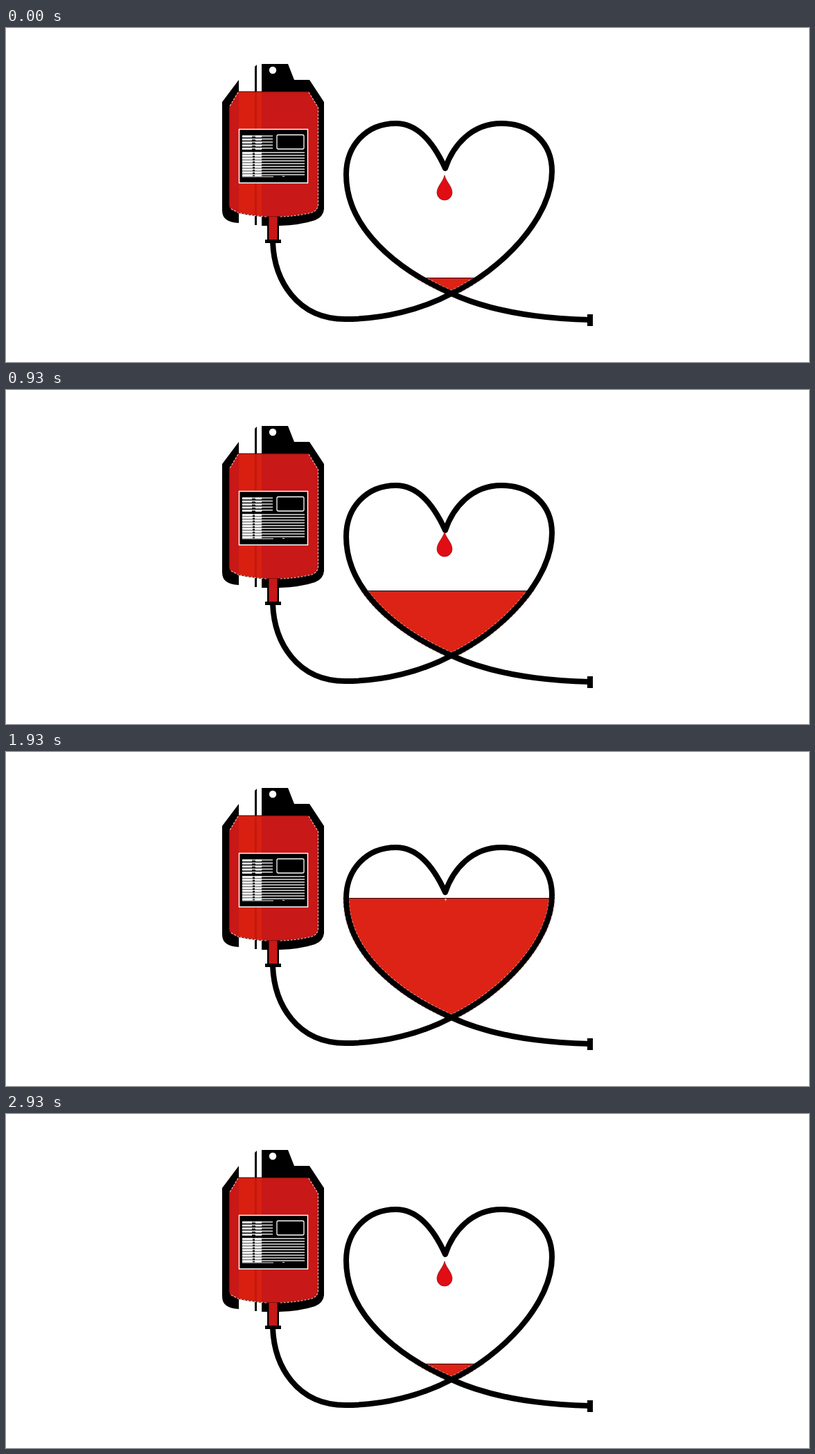
These frames come from a looping animation (1159x483 px, 3140 ms). An HTML page:

```html
<!DOCTYPE html>
<html lang="en">
<head>
<meta charset="utf-8">
<title>Blood donation</title>
<style>
  html, body { margin: 0; width: 100%; height: 100%; overflow: hidden; background: #fff; }
  svg { display: block; width: 100%; height: 100%; }
</style>
</head>
<body>
<svg viewBox="0 0 1159 483">
  <defs>
    <path id="heart" d="M643 384C715 350 788 275 788 207C788 165 757 138 715 138C672 138 645 170 634 203C619 170 597 138 563 138C520 138 491 170 491 212C491 290 565 350 643 384"/>
    <path id="body" d="M335 92H437L451 115V256Q450 265 441 267Q420 272 394 273H376Q352 271 335 267Q322 263 322 257V114Z"/>
    <clipPath id="bodyClip"><use href="#body"/></clipPath>
    <clipPath id="heartClip"><use href="#heart"/></clipPath>
    <clipPath id="levelClip"><rect id="liquid" x="480" width="320" height="300"/></clipPath>
  </defs>

  <!-- bag shell -->
  <path d="M336 75V282Q312 281 312 264V107Z"/>
  <path d="M359 56L362 53V285H359Z"/>
  <path d="M369 52H407L416 75H438L459 107V262Q458 273 446 278Q425 285 394 286H369Z"/>
  <circle cx="385" cy="61" r="5.2" fill="#fff"/>

  <!-- bag contents -->
  <g clip-path="url(#bodyClip)">
    <path fill="#c81817" d="M320 90H455V275H320Z"/>
    <path fill="#d91f0f" d="M336 90H369V275H336Z"/>
    <path fill="#c21912" d="M359 90H362V275H359Z"/>
  </g>
  <use href="#body" fill="none" stroke="#3a0806"/>
  <path d="M437 93L450.500 115V256Q449 265 441 267Q420 272 396 273M335 93L323 113M376 273Q352 271 335 267L324 261" fill="none" stroke="#eab0a8" stroke-width="1.200" stroke-dasharray="3 2"/>

  <!-- label -->
  <rect x="336.500" y="146.500" width="99" height="77.500" stroke="#fff" stroke-width="1.500"/>
  <rect x="391" y="154.500" width="39" height="20.500" rx="2" stroke="#fff" stroke-width="1.300"/>
  <g id="rows" fill="#fff"></g>

  <!-- tube -->
  <path fill="#c81817" d="M378 273H393V308H378Z"/>
  <path d="M377 273H379.500V308H377ZM391.500 273H394V308H391.500ZM374 306H397V311H374Z"/>
  <g clip-path="url(#levelClip)">
    <use href="#heart" fill="#dc2315"/>
    <use href="#heart" fill="none" stroke="#f0aaa0" stroke-width="9.600" stroke-dasharray="3 3"/>
  </g>
  <g clip-path="url(#heartClip)"><path id="surface" d="M480 0H800" stroke="#2a0504"/></g>
  <g fill="none" stroke="#000" stroke-width="8" stroke-linejoin="round">
    <use href="#heart"/>
    <path d="M385 309C387 365 420 421 490 421C545 421 600 407 643 384C695 408 760 420 843 422"/>
  </g>
  <path d="M839 414H847V431H839Z"/>

  <!-- drop -->
  <path id="ripple" d="M617 258.500H650" stroke="#444" stroke-dasharray="2 2"/>
  <path id="drop" d="M0 0C2 9 11 16 11 25A11 11 0 0 1 -11 25C-11 16 -2 9 0 0Z" fill="#e00d14" stroke="#7a0a0c" stroke-width=".6"/>
</svg>
<script>
const $ = id => document.getElementById(id);
const LOOP = 3140;

// start time, liquid level, drop tip (0 = no drop)
const stages = [
  [0, 361, 213],
  [400, 320, 211],
  [730, 290, 205],
  [1130, 260, 220],
  [1530, 211, 0],
  [2000, 130, 0],
  [2930, 361, 213]
];

function row(x, y, w, h) {
  const r = document.createElementNS("http://www.w3.org/2000/svg", "rect");
  Object.entries({ x, y, width: w, height: h }).forEach(([k, v]) => r.setAttribute(k, v));
  $("rows").append(r);
}

for (let i = 0; i < 5; i++) {
  const y = 155.5 + i * 4.4;
  row(341, y, 44, 1.3);
  row(341, y, 14, 2.8);
  row(360, y, 9, 2.8);
}
for (let i = 0; i < 9; i++) {
  const y = 179.5 + i * 4;
  row(341, y, 90, 1.3);
  row(341, y, 15, 3);
  row(359, y, 10, 3);
}
row(341, 214.5, 45, 1);
row(399, 214, 3, 1);

function draw(now) {
  const t = now % LOOP;
  const [, level, tip] = stages.findLast(s => s[0] <= t);
  $("liquid").setAttribute("y", level);
  $("surface").setAttribute("transform", `translate(0 ${level + .5})`);
  $("drop").setAttribute("transform", `translate(633 ${tip})`);
  $("drop").style.display = tip ? "" : "none";
  $("ripple").style.display = level === 260 ? "" : "none";
}

const start = performance.now();
function tick() {
  draw(performance.now() - start);
  requestAnimationFrame(tick);
}
tick();
</script>
</body>
</html>
```
